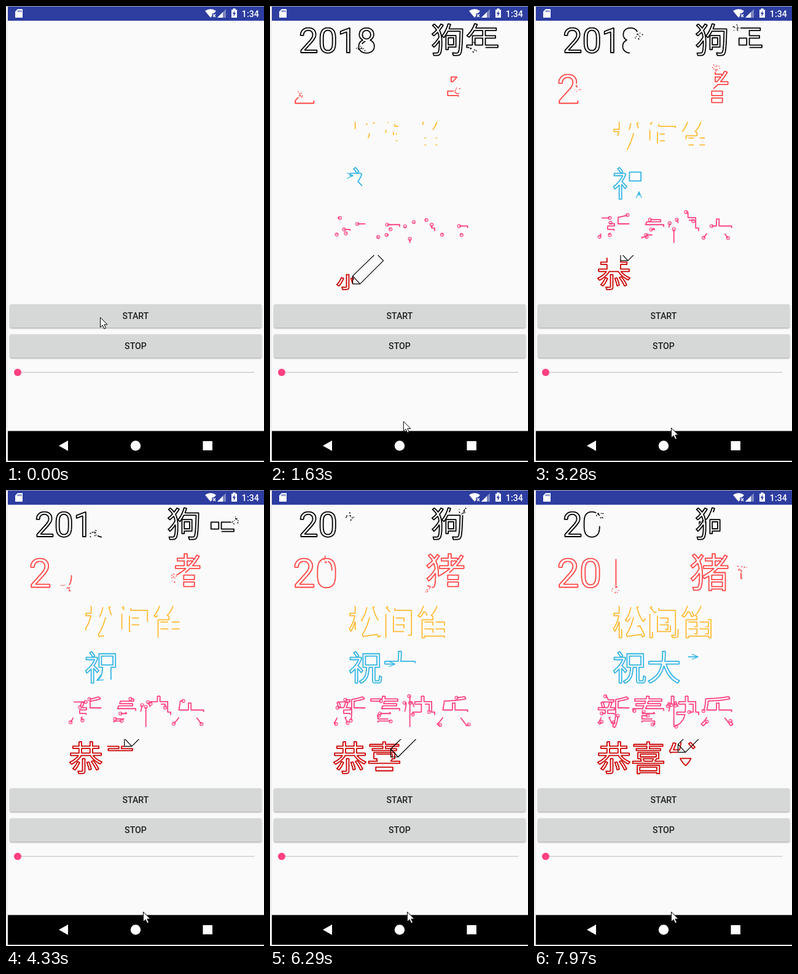
Recreate the animation shown at these times as an HTML page with a canvas. Size 420 by 743 pixels, loop 8 s.

```html
<!DOCTYPE html>
<html lang="zh-CN">
<head>
<meta charset="utf-8">
<title>Text path animation</title>
<style>
html, body { margin: 0; width: 100%; height: 100%; overflow: hidden; background: #fafafa; }
canvas { display: block; }
</style>
</head>
<body>
<canvas id="stage" width="420" height="743"></canvas>
<script>
const ctx = document.getElementById('stage').getContext('2d');
const LOOP = 8000, START = 990, STEP = 134, LEAD = 40, DURATION = 11400;
const LATIN = 'Roboto, sans-serif';
const CJK = '"Noto Sans CJK SC", "Noto Sans CJK", sans-serif';

// Where the contours of a glyph begin, in drawing order: hundredths of an em above the baseline.
const STARTS = {
  '2': [[53, 7]],
  '0': [[51, 30], [41, 42]],
  '1': [[36, 71]],
  '8': [[26, -1]],
  '狗': [[35, 80], [47, 15], [54, 22], [54, 71]],
  '年': [[32, 24], [59, 15]],
  '猪': [[66, 62], [83, 21], [83, 3], [62, 28], [35, 83]],
  '祝': [[28, 80], [42, 32], [52, 70], [78, 2]],
  '大': [[95, 50]],
  '家': [[20, 68]],
  '恭': [[18, 6], [42, 20], [60, 20], [80, 20]],
  '喜': [[12, 67], [30, 5]],
  '发': [[45, 30], [72, 75]],
  '新': [[95, 50], [52, 30], [14, 60], [45, 72], [12, 22], [38, 18]],
  '春': [[95, 40], [62, 18], [32, 7], [64, 37]],
  '快': [[9, 39], [36, 52], [25, -5], [68, 59], [95, 30]],
  '乐': [[20, 23], [92, 38], [70, 20]]
};

const ROWS = [
  { text: '2018', x: 47, y: 76, size: 56, color: '#000', brush: spray, erase: true },
  { text: '狗年', x: 261.6, y: 76, size: 56, color: '#000', brush: spray, erase: true },
  { text: '2019', x: 37.2, y: 158.5, size: 65, color: '#ff4444', brush: spray },
  { text: '猪年', x: 253.3, y: 158.5, size: 65, color: '#ff4444', brush: spray },
  { text: '松间笛', x: 127.5, y: 236, size: 56, color: '#ffbb33', together: true },
  { text: '祝大家', x: 127.5, y: 310, size: 56, color: '#33b5e5', brush: arrow },
  { text: '新春快乐', x: 102, y: 383, size: 56, color: '#ff4081', brush: ring, together: true },
  { text: '恭喜发财', x: 102, y: 457.5, size: 56, color: '#cc0000', brush: pencil }
];

// Outlines of a glyph in em units, traced from its rendered shape by marching squares.
function traceGlyph(ch, family) {
  const N = 250, EM = 180, OX = 30, OY = 190, LEVEL = 127.5;
  const c = document.createElement('canvas');
  c.width = c.height = N;
  const g = c.getContext('2d', { willReadFrequently: true });
  g.font = `${EM}px ${family}`;
  g.fillText(ch, OX, OY);
  const data = g.getImageData(0, 0, N, N).data;
  const alpha = i => data[i * 4 + 3];
  const next = new Map();
  for (let y = 0; y < N - 1; y++) {
    for (let x = 0; x < N - 1; x++) {
      const i = y * N + x;
      const inside = [i, i + 1, i + N + 1, i + N].map(k => alpha(k) > LEVEL);
      const edges = [2 * i, 2 * (i + 1) + 1, 2 * (i + N), 2 * i + 1];
      for (let e = 0; e < 4; e++) {
        if (inside[e] || !inside[(e + 1) % 4]) continue;
        let out = (e + 1) % 4;
        while (inside[(out + 1) % 4]) out = (out + 1) % 4;
        next.set(edges[e], edges[out]);
      }
    }
  }
  const point = key => {
    const i = key >> 1, down = key & 1;
    const a = alpha(i), b = alpha(down ? i + N : i + 1);
    const f = (LEVEL - a) / (b - a);
    const px = i % N + 0.5 + (down ? 0 : f);
    const py = Math.floor(i / N) + 0.5 + (down ? f : 0);
    return [(px - OX) / EM, (py - OY) / EM];
  };
  const loops = [];
  while (next.size) {
    let key = next.keys().next().value;
    const pts = [];
    while (next.has(key)) {
      pts.push(point(key));
      const to = next.get(key);
      next.delete(key);
      key = to;
    }
    if (pts.length > 8) loops.push(pts);
  }
  return loops;
}

function arrange(loops, starts = []) {
  const rest = loops.slice(), ordered = [];
  for (const [sx, sy] of starts) {
    let best = null;
    rest.forEach((pts, loop) => pts.forEach(([x, y], at) => {
      const d = Math.hypot(x - sx / 100, y + sy / 100);
      if (!best || d < best.d) best = { d, loop, at };
    }));
    if (!best) break;
    const pts = rest.splice(best.loop, 1)[0];
    ordered.push(pts.slice(best.at).concat(pts.slice(0, best.at)));
  }
  return ordered.concat(rest);
}

function buildRow(row) {
  let x = row.x;
  row.contours = [];
  for (const ch of row.text) {
    const latin = ch < '\u0100';
    const family = latin ? LATIN : CJK;
    const loops = traceGlyph(ch, family);
    if (latin) loops.forEach(l => l.reverse());
    for (const pts of arrange(loops, STARTS[ch])) {
      const path = [...pts, pts[0]].map(([u, v]) => [x + u * row.size, row.y + v * row.size]);
      const sums = [0];
      for (let i = 1; i < path.length; i++) {
        sums.push(sums[i - 1] + Math.hypot(path[i][0] - path[i - 1][0], path[i][1] - path[i - 1][1]));
      }
      row.contours.push({ path, sums, length: sums[sums.length - 1] });
    }
    ctx.font = `${row.size}px ${family}`;
    x += ctx.measureText(ch).width;
  }
  row.length = row.contours.reduce((s, c) => s + c.length, 0);
}

// Strokes a contour up to a length and returns the pen's place and heading.
function strokePart({ path, sums }, len) {
  let i = 1;
  ctx.beginPath();
  ctx.moveTo(...path[0]);
  while (i < path.length - 1 && sums[i] < len) ctx.lineTo(...path[i++]);
  const [ax, ay] = path[i - 1], [bx, by] = path[i];
  const f = Math.min(1, (len - sums[i - 1]) / (sums[i] - sums[i - 1] || 1));
  const x = ax + (bx - ax) * f, y = ay + (by - ay) * f;
  ctx.lineTo(x, y);
  ctx.stroke();
  const [px, py] = path[Math.max(0, i - 4)];
  return { x, y, angle: Math.atan2(by - py, bx - px) };
}

function line(...pts) {
  ctx.beginPath();
  pts.forEach(([x, y], i) => i ? ctx.lineTo(x, y) : ctx.moveTo(x, y));
}

const noise = n => { const v = Math.sin(n * 127.1) * 43758.5453; return v - Math.floor(v); };

function spray({ x, y, angle }, seed) {
  ctx.lineWidth = 1.4;
  for (let i = 0; i < 10; i++) {
    const n = seed * 31 + i * 3 + 1;
    const a = angle + (noise(n) - 0.5) * 1.8;
    const d = 1 + noise(n + 1) * 11, l = 0.8 + noise(n + 2) * 2;
    const cx = Math.cos(a), cy = Math.sin(a);
    line([x + cx * d, y + cy * d], [x + cx * (d + l), y + cy * (d + l)]);
    ctx.stroke();
  }
}

function arrow({ x, y, angle }) {
  const wing = s => [x - 11 * Math.cos(angle + s), y - 11 * Math.sin(angle + s)];
  ctx.lineWidth = 1.3;
  line(wing(0.42), [x, y], wing(-0.42));
  ctx.stroke();
}

function ring({ x, y }) {
  ctx.lineWidth = 1.2;
  ctx.beginPath();
  ctx.arc(x, y, 2.5, 0, 7);
  ctx.stroke();
}

function pencil({ x, y }) {
  ctx.save();
  ctx.beginPath();
  ctx.rect(3, 406, 417, 80);
  ctx.clip();
  ctx.translate(x, y);
  ctx.strokeStyle = '#000';
  ctx.lineWidth = 1.2;
  line([0, 0], [0, -13], [38, -50], [50, -38], [12, 0], [0, 0]);
  ctx.stroke();
  line([0, -13], [12, 0]);
  ctx.stroke();
  ctx.restore();
}

function drawRow(row, ms, seed) {
  const p = row.erase ? 1 - ms / DURATION : ms / DURATION;
  ctx.strokeStyle = row.color;
  ctx.lineJoin = 'round';
  let left = p * row.length, tip = null;
  for (const c of row.contours) {
    const len = row.together ? p * c.length : Math.min(left, c.length);
    if (len <= 0) break;
    ctx.lineWidth = 1.8;
    tip = strokePart(c, len);
    if (row.together && row.brush) row.brush(tip);
    left -= len;
  }
  if (tip && !row.together) row.brush(tip, seed);
}

function fill(color, x, y, w, h) {
  ctx.fillStyle = color;
  ctx.fillRect(x, y, w, h);
}

function shape(color, ...pts) {
  line(...pts);
  ctx.closePath();
  ctx.fillStyle = color;
  ctx.fill();
}

function disc(color, x, y, r) {
  ctx.beginPath();
  ctx.arc(x, y, r, 0, 7);
  ctx.fillStyle = color;
  ctx.fill();
}

function label(text, x, y, color) {
  ctx.font = `500 14.2px ${LATIN}`;
  ctx.textAlign = 'center';
  ctx.fillStyle = color;
  ctx.fillText(text, x, y);
  ctx.textAlign = 'left';
}

function button(text, y) {
  ctx.save();
  ctx.shadowColor = 'rgba(0,0,0,.35)';
  ctx.shadowBlur = 2.5;
  ctx.shadowOffsetY = 1.3;
  ctx.beginPath();
  ctx.roundRect(6.5, y, 409.5, 38, 2);
  ctx.fillStyle = '#d6d7d7';
  ctx.fill();
  ctx.restore();
  label(text, 211, y + 24, '#212121');
}

function statusBar() {
  const bar = '#2d3da0';
  fill(bar, 3, 0, 417, 24);
  fill('#a9aeb8', 0, 0, 420, 1);
  shape('#fff', [19, 5], [27, 5], [27, 19], [15, 19], [15, 9]);
  for (const x of [19, 21.5, 24]) fill(bar, x, 7, 1.2, 3);
  ctx.beginPath();
  ctx.moveTo(333, 19);
  ctx.lineTo(324, 8);
  ctx.quadraticCurveTo(333, 2, 342, 8);
  ctx.closePath();
  ctx.fillStyle = '#fff';
  ctx.fill();
  fill(bar, 335.5, 12, 7, 7);
  ctx.strokeStyle = '#fff';
  ctx.lineWidth = 1.3;
  line([337, 13.5], [341, 18]);
  ctx.stroke();
  line([341, 13.5], [337, 18]);
  ctx.stroke();
  shape('#7c86c2', [344, 19], [358, 5], [358, 19]);
  shape('#fff', [344, 19], [353, 10], [353, 19]);
  fill('#fff', 367, 6, 9, 13);
  fill('#fff', 369.5, 4, 4, 2);
  shape(bar, [372.3, 7.5], [368.8, 13], [371, 13], [370.5, 17.3], [374.2, 11.5], [372, 11.5]);
  label('1:34', 397.8, 17.5, '#fff');
}

function navBar() {
  fill('#000', 3, 692.5, 417, 48.5);
  shape('#fff', [86, 716.5], [101, 708], [101, 725]);
  disc('#fff', 211, 716.5, 8.2);
  fill('#fff', 320.5, 709, 15.5, 15);
}

function cursor(ms) {
  const a = Math.min(1, Math.max(0, ms / 640));
  const b = Math.min(1, Math.max(0, (ms - 640) / 260));
  ctx.save();
  ctx.translate(153.5 + 63 * a + 7 * b, 507.5 + 168 * a + 12 * b);
  shape('#fff', [0, 0], [0, 16], [3.7, 12.5], [6.4, 18.5], [9, 17.4], [6.4, 11.5], [11.5, 11.5]);
  ctx.strokeStyle = '#000';
  ctx.lineWidth = 1;
  ctx.lineJoin = 'miter';
  ctx.stroke();
  ctx.restore();
}

function draw(t) {
  const k = t < START ? -1 : Math.floor((t - START + LEAD) / STEP);
  fill('#fafafa', 0, 0, 420, 743);
  fill('#efefef', 0, 0, 3, 743);
  statusBar();
  if (k >= 0) ROWS.forEach((row, i) => drawRow(row, k * STEP, k * 8 + i));
  button('START', 486);
  button('STOP', 535);
  fill('#cfcfcf', 19, 596.2, 385, 1.5);
  disc('#ff4081', 19, 597, 6);
  navBar();
  cursor(k * STEP);
}

ROWS.forEach(buildRow);
const began = performance.now();
function tick() {
  draw((performance.now() - began) % LOOP);
  requestAnimationFrame(tick);
}
tick();
</script>
</body>
</html>
```
